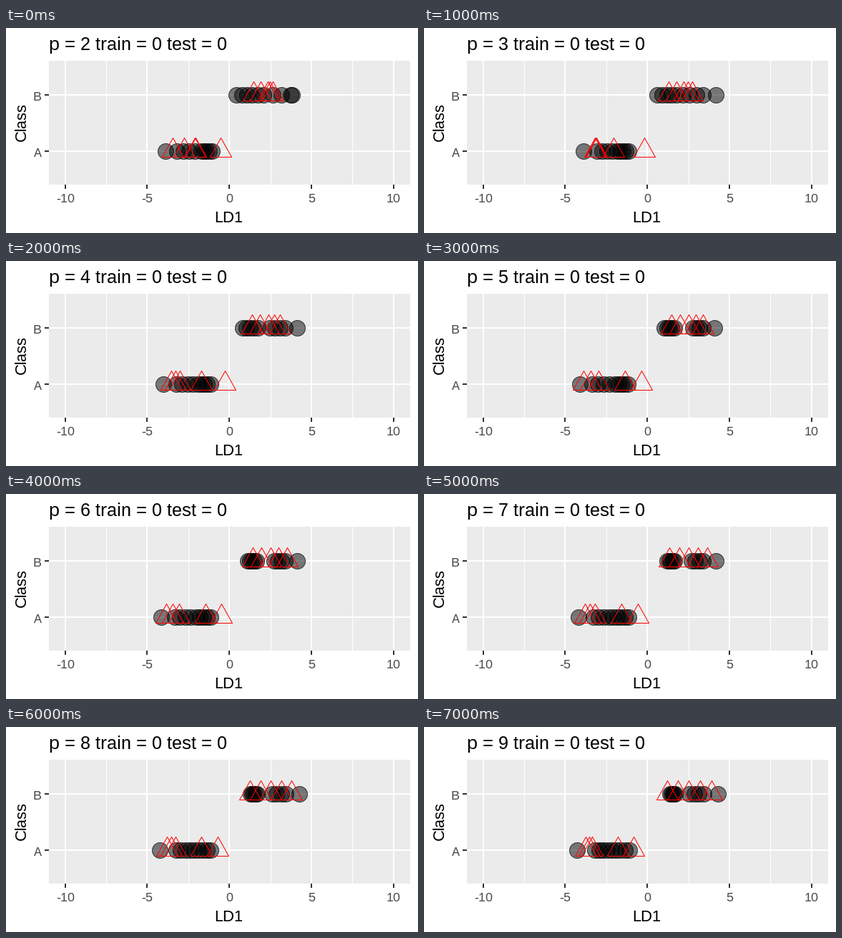
Recreate the animation shown at these times as a matplotlib script. Size 576 by 288 pixels, loop 8000 ms.

```python
import matplotlib.pyplot as plt
import numpy as np
from matplotlib.animation import FuncAnimation
from matplotlib.collections import PolyCollection
from matplotlib.patches import Rectangle

plt.rcParams.update({
    "font.family": "Liberation Sans",
    "text.hinting": "native",
    "text.hinting_factor": 1,
})

W, H, DPI = 576, 288, 144
PX = 72 / DPI                      # one pixel in points
LEFT, RIGHT, TOP, BOTTOM = 60, 565, 46, 220
ROW = {"A": 173, "B": 94}
RADIUS = 11
TRIANGLE = np.array([(0, -18), (15, 9), (-15, 9)])


class Cloud:
    """Sorted points in one row, spread along a bent line that drifts with p.

    ranks: where the line bends; shapes: x at each bend, one per key p.
    """
    KEYS = (2, 3, 5, 9)

    def __init__(self, row, count, ranks, shapes):
        self.y = ROW[row]
        self.count, self.ranks = count, ranks
        self.paths = np.transpose(shapes)

    def at(self, p):
        bends = [np.interp(p, self.KEYS, path) for path in self.paths]
        xs = np.round(np.interp(range(self.count), self.ranks, bends))
        return np.column_stack([xs, np.full(self.count, self.y)]) - 0.5


TRAIN = [
    Cloud("A", 10, (0, 1, 5, 9),
          [(223, 239, 273, 288), (223, 242, 270, 286),
           (218, 235, 267, 285), (214, 239, 262, 287)]),
    Cloud("B", 10, (0, 4, 5, 8, 9),
          [(322, 352, 360, 398, 400), (326, 353, 362, 390, 408),
           (336, 350, 376, 390, 406), (344, 351, 371, 391, 411)]),
]
TEST = [
    Cloud("A", 5, (0, 2, 3, 4),
          [(234, 265, 266, 301), (240, 242, 266, 309),
           (224, 245, 282, 305), (227, 236, 272, 294)]),
    Cloud("B", 5, (0, 2, 4),
          [(347, 367, 374), (343, 364, 376),
           (347, 371, 391), (341, 371, 403)]),
]

fig = plt.figure(figsize=(W / DPI, H / DPI), dpi=DPI, facecolor="white")
ax = fig.add_axes([0, 0, 1, 1])
ax.set_xlim(0, W)
ax.set_ylim(H, 0)
ax.axis("off")


def box(x0, y0, x1, y1, color):
    ax.add_patch(Rectangle((x0, y0), x1 - x0, y1 - y0, fc=color, lw=0))


def label(x, y, text, size, color="black", **kw):
    return ax.text(x, y, text, size=size, color=color, va="baseline", **kw)


def x_px(value):
    return round(312.2 + 22.955 * value)


box(LEFT, TOP, RIGHT, BOTTOM, "#EBEBEB")
for v in (-7.5, -2.5, 2.5, 7.5):
    box(x_px(v), TOP, x_px(v) + 1, BOTTOM, "white")
for name, y in ROW.items():
    box(LEFT, y - 1, RIGHT, y + 1, "white")
    box(LEFT - 6, y - 1, LEFT, y + 1, "#333333")
    label(50, y + 8, name, 9, "#4D4D4D", ha="right")
for v in range(-10, 11, 5):
    x = x_px(v)
    box(x - 1, TOP, x + 1, BOTTOM, "white")
    box(x - 1, BOTTOM, x + 1, BOTTOM + 6, "#333333")
    label(x, 245, str(v), 9, "#4D4D4D", ha="center")

label(311, 273, "LD1", 11, ha="center")
label(28, 132, "Class", 11, ha="center", rotation=90, rotation_mode="anchor")
title = label(LEFT, 31, "", 13, ha="left")

dots = ax.scatter([], [], s=(2 * RADIUS * PX) ** 2, facecolors=[(0, 0, 0, 0.5)],
                  edgecolors=[(0, 0, 0, 0.7)], linewidths=PX, zorder=3)
dots.set_snap(False)
triangles = PolyCollection([], facecolors="none", edgecolors="red",
                           linewidths=PX, zorder=4)
triangles.set_snap(False)
ax.add_collection(triangles, autolim=False)


def draw(step):
    p = step + 2
    title.set_text(f"p = {p} train = 0 test = 0")
    dots.set_offsets(np.vstack([cloud.at(p) for cloud in TRAIN]))
    triangles.set_verts([TRIANGLE + c for cloud in TEST for c in cloud.at(p)])
    return title, dots, triangles


anim = FuncAnimation(fig, draw, frames=8, interval=1000, repeat=True,
                     repeat_delay=0, blit=False)
plt.show()
```
